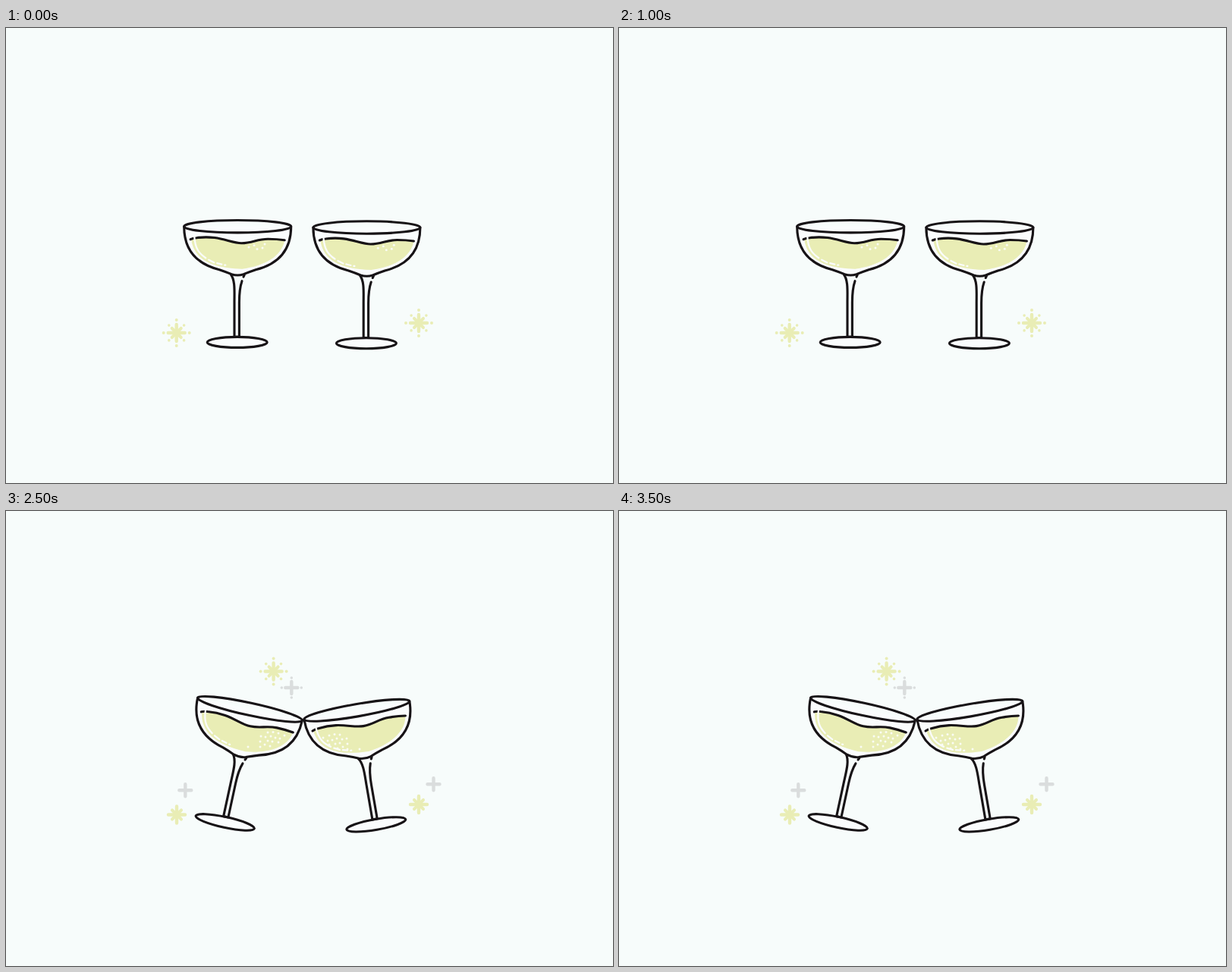
Animation, 800 px wide and 600 px high, one loop 4000 ms. Source, as an HTML page:

```html
<!DOCTYPE html>
<html lang="en">
<head>
<meta charset="utf-8">
<title>Cheers</title>
<style>
  html, body { margin: 0; width: 100%; height: 100%; overflow: hidden; background: #f7fcfb; }
  svg { display: block; }
  .ink { fill: none; stroke: #171316; stroke-width: 3.1; stroke-linecap: round; stroke-linejoin: round; }
  .body { fill: #fafcfd; }
  .liquid { fill: #e9edb5; }
  .shine { fill: none; stroke: #fafcfb; stroke-width: 2.3; stroke-linecap: round; }
  .bubbles { fill: #fafcf4; }
  .yellow { fill: #e9edb5; stroke: #e9edb5; }
  .gray { fill: #dadddd; stroke: #dadddd; }
  .yellow, .gray { stroke-linecap: round; }
</style>
</head>
<body>
<svg width="800" height="600" viewBox="0 0 800 600">
  <defs>
    <!-- the origin is the centre of the rim -->
    <g id="glass">
      <ellipse class="ink body" cx="-.5" cy="152.7" rx="39.5" ry="7"/>
      <path class="ink" d="M-9 63C-3 71-4.2 85-4.2 100V145.5H2.2V100C2.2 88 3 80 5.8 72"/>
      <path class="ink body" d="M-70.5 0C-70.5 30-56 49-24 57Q-15 60-8 63Q0 65.5 8 63Q15 60 24 57C56 49 70.5 30 70.5 0"/>
      <path class="ink" d="M9 64L7.8 66.5"/>
      <path class="liquid" d="M-61 17C-25 10-10 22 5 22C20 22 25 16.5 40 16.5Q52 16.5 62 18.5C58 40 35 52 6 56C-36 55-58 42-61 17Z"/>
      <path class="ink" d="M-62 17Q-58 15-54 15C-25 11-10 22 5 22C20 22 25 16.5 40 16.5Q52 16.5 62 18"/>
      <path class="shine" d="M-57 13C-56 30-50 36-42 41.5M-38 44L-31 47.5M-27 48.5L-21 50M-17 51H-16"/>
      <ellipse class="ink" rx="70.5" ry="8.2"/>
    </g>
  </defs>
  <g id="apart">
    <use href="#glass" x="305.2" y="261.7"/>
    <use href="#glass" x="475.4" y="263"/>
  </g>
  <g id="clink">
    <use href="#glass" transform="translate(321.5 261.3) rotate(12.2)"/>
    <use href="#glass" transform="translate(462.3 262.8) rotate(-9.8)"/>
  </g>
</svg>
<script>
const apart = document.getElementById('apart');
const clink = document.getElementById('clink');

const dot = (x, y, r) => `<circle cx="${x}" cy="${y}" r="${r}" stroke="none"/>`;
const add = (scene, kind, body) =>
  scene.insertAdjacentHTML('beforeend', `<g class="${kind}">${body}</g>`);

function bubbles(scene, points, place = (x, y) => [x, y]) {
  add(scene, 'bubbles', points.map(([x, y]) => dot(...place(x, y), 1.5)).join(''));
}

const cross = (x, y, size, width) =>
  `<path stroke-width="${width}" d="M${x - size} ${y}h${2 * size}M${x} ${y - size}v${2 * size}"/>`;

function ring(x, y, count, radius, r, turn = 0) {
  return Array.from({ length: count }, (_, i) => {
    const a = turn + i * 2 * Math.PI / count;
    return dot(x + radius * Math.cos(a), y + radius * Math.sin(a), r);
  }).join('');
}

function star(scene, x, y, dots) {
  const arms = cross(x, y, 11, 4.4);
  const diagonals = `<g transform="rotate(45 ${x} ${y})">${cross(x, y, 8.5, 4)}</g>`;
  const tips = dots ? ring(x, y, 4, 17, 2) + ring(x, y, 4, 14, 1.8, Math.PI / 4) : '';
  add(scene, 'yellow', arms + diagonals + tips);
}

function plus(scene, x, y, dots) {
  add(scene, 'gray', cross(x, y, 8, 4.4) + (dots ? ring(x, y, 4, 13, 1.8) : ''));
}

const few = [[320, 289], [327, 286.5], [331, 291.5], [338, 290], [341, 285]];
bubbles(apart, few);
bubbles(apart, few, (x, y) => [x + 170.3, y + 1.3]);
star(apart, 224.7, 402, true);
star(apart, 544, 389, true);

const many = [
  [345, 292], [352, 291.5], [359, 293], [336, 297], [342, 298], [349, 297], [367, 296],
  [355, 299], [361, 300], [345, 303], [335, 304], [351, 304], [359, 305],
  [341, 308], [348, 310], [335, 311], [319, 311]
];
bubbles(clink, many);
bubbles(clink, many, (x, y) => [785 - x, y + 3]);
star(clink, 352.6, 211.5, true);
star(clink, 225, 400.5, false);
star(clink, 544, 387, false);
plus(clink, 376.3, 233, true);
plus(clink, 236.3, 368.3, false);
plus(clink, 563.5, 360.3, false);

const start = performance.now();
function draw(now) {
  const together = Math.floor(Math.max(0, now - start) / 500) % 2 === 1;
  apart.style.display = together ? 'none' : '';
  clink.style.display = together ? '' : 'none';
  requestAnimationFrame(draw);
}
draw(start);
</script>
</body>
</html>
```
